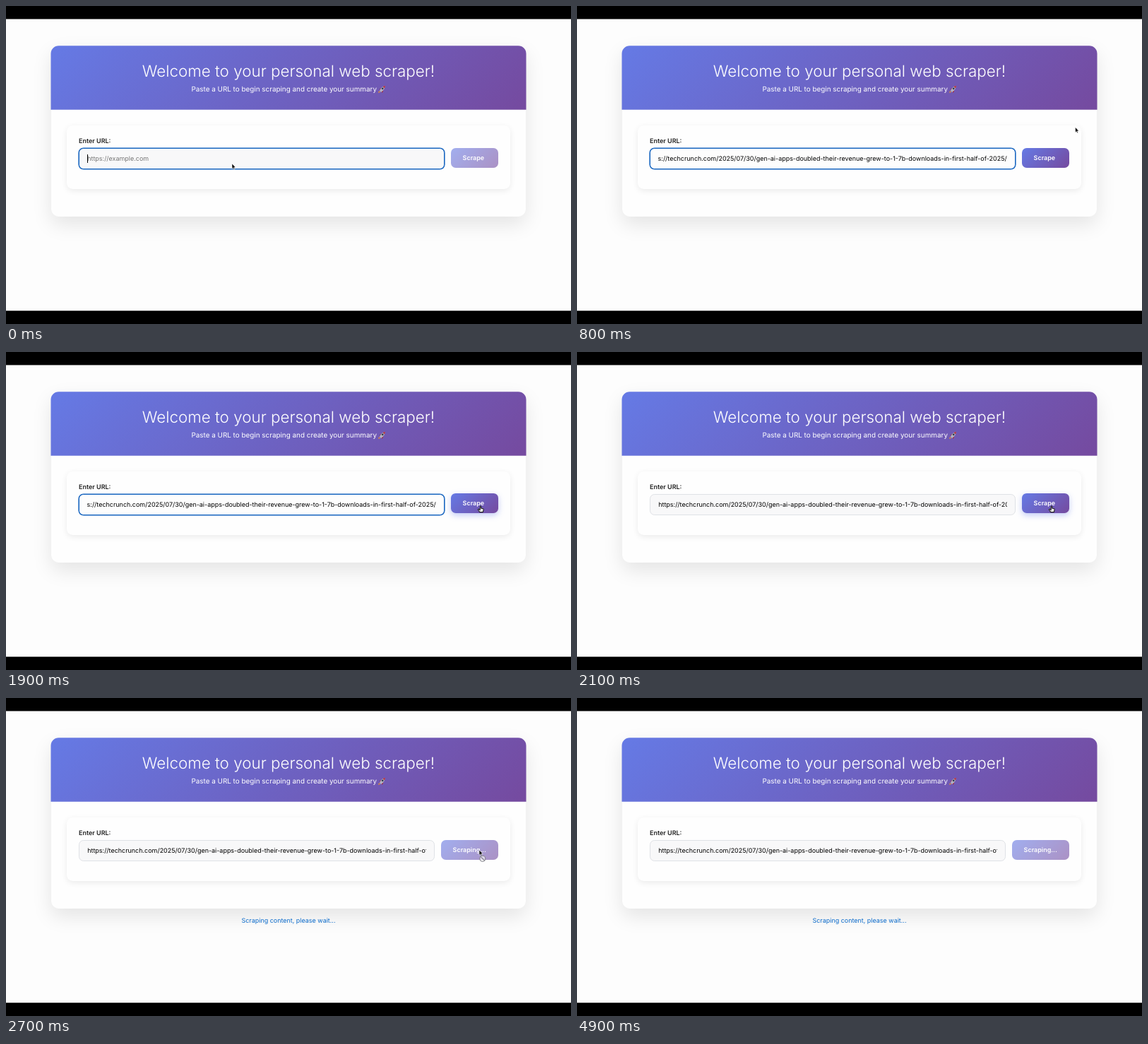
An HTML page for the animation above (8000 ms loop, 800 by 450 pixels).

```html
<!DOCTYPE html>
<html lang="en">
<head>
<meta charset="utf-8">
<title>Web scraper</title>
<style>
html, body { margin: 0; width: 100%; height: 100%; overflow: hidden; background: #000; }
#stage { position: relative; width: 800px; height: 450px; overflow: hidden; background: #000;
  font: 400 8.96px/12px Inter, sans-serif; color: #000; text-rendering: geometricPrecision; }
#stage div, #stage svg { position: absolute; box-sizing: border-box; white-space: pre; }
/* clip-path insets give edges that fall between whole pixels */
#page { left: 0; top: 18px; width: 800px; height: 414px; background: #fdfdfd; clip-path: inset(.5px 0 .7px); }
#card { left: 64px; top: 56px; width: 672px; height: 242px; border-radius: 11.2px;
  background: #fefefe; box-shadow: 0 11px 28px rgba(0,0,0,.1); }
#head, #fill { background: linear-gradient(135deg, #657ae5, #754a9f); }
#head { left: 63px; top: 56px; width: 674px; height: 91px; clip-path: inset(.2px .5px .3px round 11.2px 11.2px 0 0); }
#title { left: 0; top: 79px; width: 800px; text-align: center; color: #fff; font-size: 22.4px; line-height: 28px; font-weight: 300; }
#sub { left: 262.5px; top: 111px; color: #fff; font-size: 9.9px; line-height: 14px; }
#panel { left: 86px; top: 169px; width: 628px; height: 90px; border-radius: 8.4px;
  background: #fefefe; box-shadow: 0 2.5px 9px rgba(0,0,0,.08); }
#label { left: 103px; top: 186px; font-weight: 600; color: #222; }
#field { left: 103px; top: 201px; height: 30px; border: 1px solid; border-radius: 6.7px; }
#clip { left: 114.5px; top: 205px; height: 22px; overflow: hidden; }
#url { top: 6px; }
#caret { top: 210px; width: 1px; height: 12px; background: #000; }
#button { top: 201px; height: 28px; }
#fill { inset: 0; padding-left: 16.6px; border-radius: 6.7px; color: #fff; font-weight: 600; line-height: 29px; }
#note { left: 0; top: 310px; width: 800px; text-align: center; color: #0b6bcb; }
#stage svg { overflow: visible; }
</style>
</head>
<body>
<div id="stage">
  <div id="page"></div>
  <div id="card"></div>
  <div id="head"></div>
  <div id="title">Welcome to your personal web scraper!</div>
  <div id="sub">Paste a URL to begin scraping and create your summary</div>
  <svg style="left:527px;top:113px" width="10" height="10">
    <path d="M0 10 1 7 3 9Z" fill="#e08a3c"/>
    <path d="M1.5 5.2 4 3 5 5ZM5 8 7 6 7 8 5 10Z" fill="#a32a3c"/>
    <path d="M2 7Q4 1 10 0Q9 6 4 9Z" fill="#b4b2c0"/>
    <path d="M6.5 1.1Q8.5.2 10 0Q9.8 1.5 9 3.4Z" fill="#b52f3d"/>
    <circle cx="6.2" cy="3.8" r="1.4" fill="#2f3d50"/>
  </svg>
  <div id="panel"></div>
  <div id="label">Enter URL:</div>
  <div id="field"></div>
  <div id="clip"><div id="url"></div></div>
  <div id="caret"></div>
  <div id="button"><div id="fill"></div></div>
  <div id="note">Scraping content, please wait...</div>
  <svg id="cursor" style="left:0;top:0" width="1" height="1">
    <path id="arrow" d="M0 0V7.4L1.7 5.9 2.8 8.3 4 7.8 2.9 5.4H5.1Z" fill="#000" stroke="#fff" stroke-width=".6"/>
    <path id="hand" d="M-.8-3.6Q0-4.4.6-3.6V-1L3.6-.3Q4.4 0 4.1 1.4L3.2 4.6H-1.2L-3.6 1.2Q-3.6 0-2.4.5L-.9 1.5Z"
      fill="#eee" stroke="#222" stroke-width="1.1"/>
    <g id="ban" fill="#fff" fill-opacity=".6" stroke="#85858d" stroke-width="1.1">
      <circle cx="4.8" cy="12.2" r="4"/><path d="M2 9.4 7.6 15"/>
    </g>
  </svg>
</div>
<script>
const LOOP = 8000, PASTE = 400, HOVER = 1200, BLUR = 2100, SEND = 2200, BAN = 2500, GONE = 4900;
const ADDRESS = "https://techcrunch.com/2025/07/30/gen-ai-apps-doubled-their-revenue-grew-to-1-7b-downloads-in-first-half-of-2025/";
const $ = id => document.getElementById(id);
const css = (id, style) => Object.assign($(id).style, style);
const show = (id, on) => css(id, { display: on ? "" : "none" });
const text = (id, s) => { if ($(id).textContent !== s) $(id).textContent = s; };
const ramp = (t, a, b) => Math.min(1, Math.max(0, (t - a) / (b - a)));
const ease = p => p * p * (3 - 2 * p);

// [time, x, y] of the pointer
const path = [[0, 320, 223], [100, 320, 223], [800, 705.5, 171.5], [900, 705.5, 171.5],
  [1200, 672, 222], [2400, 672, 222], [BAN, 670, 215], [4600, 670, 215], [4800, 683, 216]];

function pointer(t) {
  const i = path.findIndex(p => p[0] > t);
  if (i < 0) return path[path.length - 1].slice(1);
  const [a, x, y] = path[i - 1], [b, u, v] = path[i], p = ease(ramp(t, a, b));
  return [x + (u - x) * p, y + (v - y) * p];
}

function draw(t) {
  const pasted = t >= PASTE, focus = t < BLUR, busy = t >= SEND;
  const right = busy ? 607 : 621, left = busy ? 616 : 630;

  css("field", { width: right - 103 + "px",
    borderColor: focus ? "#1765c0" : "#dfe2e6",
    boxShadow: focus ? "0 0 0 .6px #1765c0" : "none",
    background: focus && t >= 100 ? "#fdfdfd" : "#f8f8f9" });
  css("clip", { width: right - 12 - 114.5 + "px" });
  text("url", pasted ? ADDRESS : "https://example.com");
  const atEnd = pasted && focus;
  css("url", { color: pasted ? "#000" : "#757575", left: atEnd ? "auto" : ".7px", right: atEnd ? ".3px" : "auto" });

  const blink = t < 500 ? 1 : ramp(t, 900, 1200) - ramp(t, 1400, 1700);
  css("caret", { left: pasted ? "608px" : "115px", opacity: focus ? blink : 0 });

  const on = ramp(t, PASTE, PASTE + 300) - ramp(t, SEND - 100, SEND + 200);
  const lift = ramp(t, HOVER - 200, HOVER) - ramp(t, SEND - 100, SEND + 200);
  css("button", { left: left + "px", width: 697 - left + "px", opacity: .6 + .4 * on,
    transform: `translateY(${-1.1 * lift}px)` });
  css("fill", { boxShadow: `0 3px 8px rgba(102,126,234,${.4 * lift})` });
  text("fill", busy ? "Scraping..." : "Scrape");
  show("note", busy);

  const [x, y] = pointer(t), hand = t >= HOVER - 100 && t < BAN;
  $("cursor").style.transform = `translate(${x}px,${y}px)`;
  show("cursor", t < GONE);
  show("arrow", !hand);
  show("hand", hand);
  show("ban", t >= BAN);
}

function tick() {
  draw(Math.floor(performance.now() % LOOP / 100) * 100);
  requestAnimationFrame(tick);
}
tick();
</script>
</body>
</html>
```
